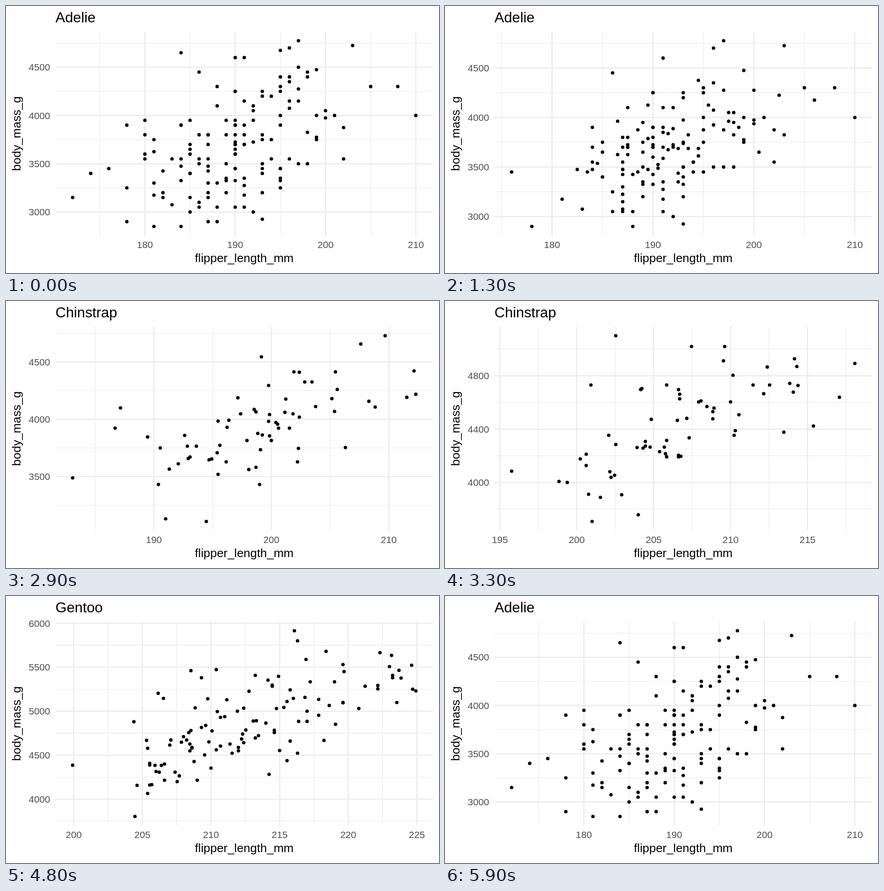
Recreate the animation shown at these times as an HTML page with a canvas. Size 952x588 px, loop 6 s.

```html
<!DOCTYPE html>
<html lang="en">
<head>
<meta charset="utf-8">
<title>Penguin scatter plot</title>
<style>
html, body { margin: 0; width: 100%; height: 100%; overflow: hidden; background: #fff; }
canvas { display: block; }
</style>
</head>
<body>
<canvas id="stage" width="952" height="588"></canvas>
<script>
const species = [
  {
    name: 'Adelie',
    flipper: [
      181,186,195,193,190,181,195,182,191,198,185,195,197,184,194,
      174,180,189,185,180,187,183,187,172,180,178,178,188,184,195,196,190,180,181,184,
      182,195,186,196,185,190,182,190,191,186,188,190,200,187,191,186,193,181,194,
      185,195,185,192,184,192,195,188,190,198,190,190,196,197,190,195,191,184,187,195,
      189,196,187,193,191,194,190,189,189,190,202,205,185,186,187,208,190,196,178,192,
      192,203,183,190,193,184,199,190,181,197,198,191,193,197,191,196,188,199,189,189,
      187,198,176,202,186,199,191,195,191,210,190,197,193,199,187,190,191,200,185,193,
      193,187,188,190,192,185,190,184,195,193,187,201],
    mass: [
      3750,3800,3250,3450,3650,3625,4675,3200,3800,4400,3700,3450,4500,3325,4200,
      3400,3600,3800,3950,3800,3800,3550,3200,3150,3950,3250,3900,3300,3900,3325,4150,3950,3550,3300,4650,
      3150,3900,3100,4400,3000,4600,3425,3450,4150,3500,4300,3450,4050,2900,3700,3550,3800,2850,3750,
      3150,4400,3600,4050,2850,3950,3350,4100,3050,4450,3600,3900,3550,4150,3700,4250,3700,3900,3550,4000,
      3200,4700,3800,4200,3350,3550,3800,3500,3950,3600,3550,4300,3400,4450,3300,4300,3700,4350,2900,4100,
      3725,4725,3075,4250,2925,3550,3750,3900,3175,4775,3825,4600,3200,4275,3900,4075,2900,3775,3350,3325,
      3150,3500,3450,3875,3050,4000,3275,4300,3050,4000,3325,3500,3500,4475,3425,3900,3175,3975,3400,4250,
      3400,3475,3050,3725,3000,3650,4250,3475,3450,3750,3700,4000],
  },
  {
    name: 'Chinstrap',
    flipper: [
      192,196,193,188,197,198,178,197,195,198,193,194,185,201,190,201,197,181,190,195,
      181,191,187,193,195,197,200,200,191,205,187,201,187,203,195,199,195,210,192,205,
      210,187,196,196,196,201,190,212,187,198,199,201,193,203,187,197,191,203,202,194,
      206,189,195,207,202,193,210,198],
    mass: [
      3500,3900,3650,3525,3725,3950,3250,3750,4150,3700,3800,3775,3700,4050,3575,4050,3300,3700,3450,4400,
      3600,3400,2900,3800,3300,4150,3400,3800,3700,4550,3200,4300,3350,4100,3600,3900,3850,4800,2700,4500,
      3950,3650,3550,3500,3675,4450,3400,4300,3250,3675,3325,3950,3600,4050,3350,3450,3250,4050,3800,3525,
      3950,3650,3650,4000,3400,3775,4100,3775],
  },
  {
    name: 'Gentoo',
    flipper: [
      211,230,210,218,215,210,211,219,209,215,214,216,214,213,210,217,210,221,209,222,
      218,215,213,215,215,215,215,210,220,222,209,207,230,220,220,213,219,208,208,
      208,225,210,216,222,217,210,225,213,215,210,220,210,225,217,220,208,220,208,224,
      208,221,214,231,219,230,229,220,223,216,221,221,217,216,230,209,220,215,223,
      212,221,212,224,212,228,218,218,212,230,218,228,212,224,214,226,216,222,203,225,
      219,228,215,228,215,210,219,208,209,216,229,213,230,217,230,222,214,215,222,212,213],
    mass: [
      4500,5700,4450,5700,5400,4550,4800,5200,4400,5150,4650,5550,4650,5850,4200,5850,4150,6300,4800,5350,
      5700,5000,4400,5050,5000,5100,5650,4600,5550,5250,4700,5050,6050,5150,5400,4950,5250,4350,5350,
      3950,5700,4300,4750,5550,4900,4200,5400,5100,5300,4850,5300,4400,5000,4900,5050,4300,5000,4450,5550,
      4200,5300,4400,5650,4700,5700,5800,4700,5550,4750,5000,5100,5200,4700,5800,4600,6000,4750,5950,
      4625,5450,4725,5350,4750,5600,4600,5300,4875,5550,4950,5400,4750,5650,4850,5200,4925,4875,4625,5250,
      4850,5600,4975,5500,5500,4700,5500,4575,5500,5000,5950,4650,5500,4375,5850,6000,4925,4850,5750,5200,5400],
  },
];
for (const s of species) s.points = s.flipper.map((x, i) => [x, s.mass[i]]);

// Tweens between species: tick before the first step, and number of steps
const tweens = [{ start: 6, steps: 14 }, { start: 27, steps: 13 }, { start: 47, steps: 13 }];
const panel = { left: 108.8, right: 938.8, top: 56, bottom: 506 };
const ctx = document.getElementById('stage').getContext('2d');

function sceneAt(tick) {
  const n = tweens.findLastIndex(t => tick >= t.start);
  if (n < 0) return species[0];
  const { start, steps } = tweens[n], step = tick - start;
  const from = species[n], to = species[(n + 1) % 3];
  if (step >= steps) return to;
  const t = step / steps;
  // Unpaired points wait for the end of the tween to leave or appear
  const points = from.points.map(([x, y], i) => {
    const [tx, ty] = to.points[i] || [x, y];
    return [x + (tx - x) * t, y + (ty - y) * t];
  });
  return { name: (step > 7 ? to : from).name, points };
}

// Extended Wilkinson tick labelling, aiming for five breaks
function findBreaks(lo, hi) {
  const nice = [1, 5, 2, 2.5, 4, 3], range = hi - lo;
  let best = { score: -Infinity };
  for (let j = 1; j <= 3; j++) nice.forEach((q, i) => {
    for (let k = 2; k <= 10; k++) {
      const z0 = Math.ceil(Math.log10(range / (k + 1) / j / q));
      for (let z = z0; z < z0 + 2; z++) {
        const step = j * q * 10 ** z, span = step * (k - 1);
        const last = Math.ceil(lo / step) * j;
        for (let s = (Math.floor(hi / step) - k + 1) * j; s <= last; s++) {
          const min = s * step / j, max = min + span;
          const simplicity = 1 - i / 5 - j;
          const coverage = 1 - 0.5 * ((hi - max) ** 2 + (lo - min) ** 2) / (0.1 * range) ** 2;
          const ratio = (k - 1) / span / (4 / (Math.max(max, hi) - Math.min(min, lo)));
          const density = 2 - Math.max(ratio, 1 / ratio);
          const score = 0.25 * simplicity + 0.2 * coverage + 0.5 * density;
          if (score > best.score) best = { score, min, step, k };
        }
      }
    }
  });
  return best;
}

function makeAxis(values, a, b) {
  const min = Math.min(...values), max = Math.max(...values), pad = (max - min) * 0.05;
  const lo = min - pad, hi = max + pad;
  const { min: first, step, k } = findBreaks(lo, hi);
  const inside = v => v >= lo && v <= hi;
  const major = Array.from({ length: k }, (_, i) => first + i * step).filter(inside);
  const minor = Array.from({ length: k + 1 }, (_, i) => first + (i - 0.5) * step).filter(inside);
  const digits = major.some(v => v % 1) ? 1 : 0;
  return { major, minor, label: v => v.toFixed(digits), pos: v => a + (v - lo) / (hi - lo) * (b - a) };
}

function text(str, x, y, size, align, color = '#000') {
  ctx.font = `${size}px "Liberation Sans", Arial, sans-serif`;
  ctx.textAlign = align;
  ctx.fillStyle = color;
  ctx.fillText(str, x, y);
}

function draw(tick) {
  const { name, points } = sceneAt(tick);
  const { left, right, top, bottom } = panel;
  const xAxis = makeAxis(points.map(p => p[0]), left, right);
  const yAxis = makeAxis(points.map(p => p[1]), bottom, top);

  ctx.fillStyle = '#fff';
  ctx.fillRect(0, 0, 952, 588);

  ctx.save();
  ctx.beginPath();
  ctx.rect(left, top, right - left, bottom - top);
  ctx.clip();
  ctx.strokeStyle = '#ebebeb';
  for (const [kind, width] of [['minor', 1.28], ['major', 2.56]]) {
    ctx.lineWidth = width;
    ctx.beginPath();
    for (const y of yAxis[kind].map(yAxis.pos)) { ctx.moveTo(left, y); ctx.lineTo(right, y); }
    for (const x of xAxis[kind].map(xAxis.pos)) { ctx.moveTo(x, top); ctx.lineTo(x, bottom); }
    ctx.stroke();
  }
  ctx.fillStyle = '#000';
  for (const [x, y] of points) {
    ctx.beginPath();
    ctx.arc(xAxis.pos(x), yAxis.pos(y), 3.8, 0, 2 * Math.PI);
    ctx.fill();
  }
  ctx.restore();

  for (const v of xAxis.major) text(xAxis.label(v), xAxis.pos(v), 533.3, 21.12, 'center', '#4d4d4d');
  for (const v of yAxis.major) text(yAxis.label(v), 97, yAxis.pos(v) + 7.5, 21.12, 'right', '#4d4d4d');
  text(name, 108.8, 36.3, 31.68, 'left');
  text('flipper_length_mm', 523.8, 564, 26.4, 'center');
  ctx.save();
  ctx.translate(32.3, 281);
  ctx.rotate(-Math.PI / 2);
  text('body_mass_g', 0, 0, 26.4, 'center');
  ctx.restore();
}

let shown = -1;
function play() {
  const frame = Math.floor(performance.now() % 6000 / 100);
  // The timeline has 61 ticks for 60 frames, so one is skipped halfway
  const tick = frame < 30 ? frame : frame + 1;
  if (tick !== shown) draw(shown = tick);
  requestAnimationFrame(play);
}
play();
</script>
</body>
</html>
```
